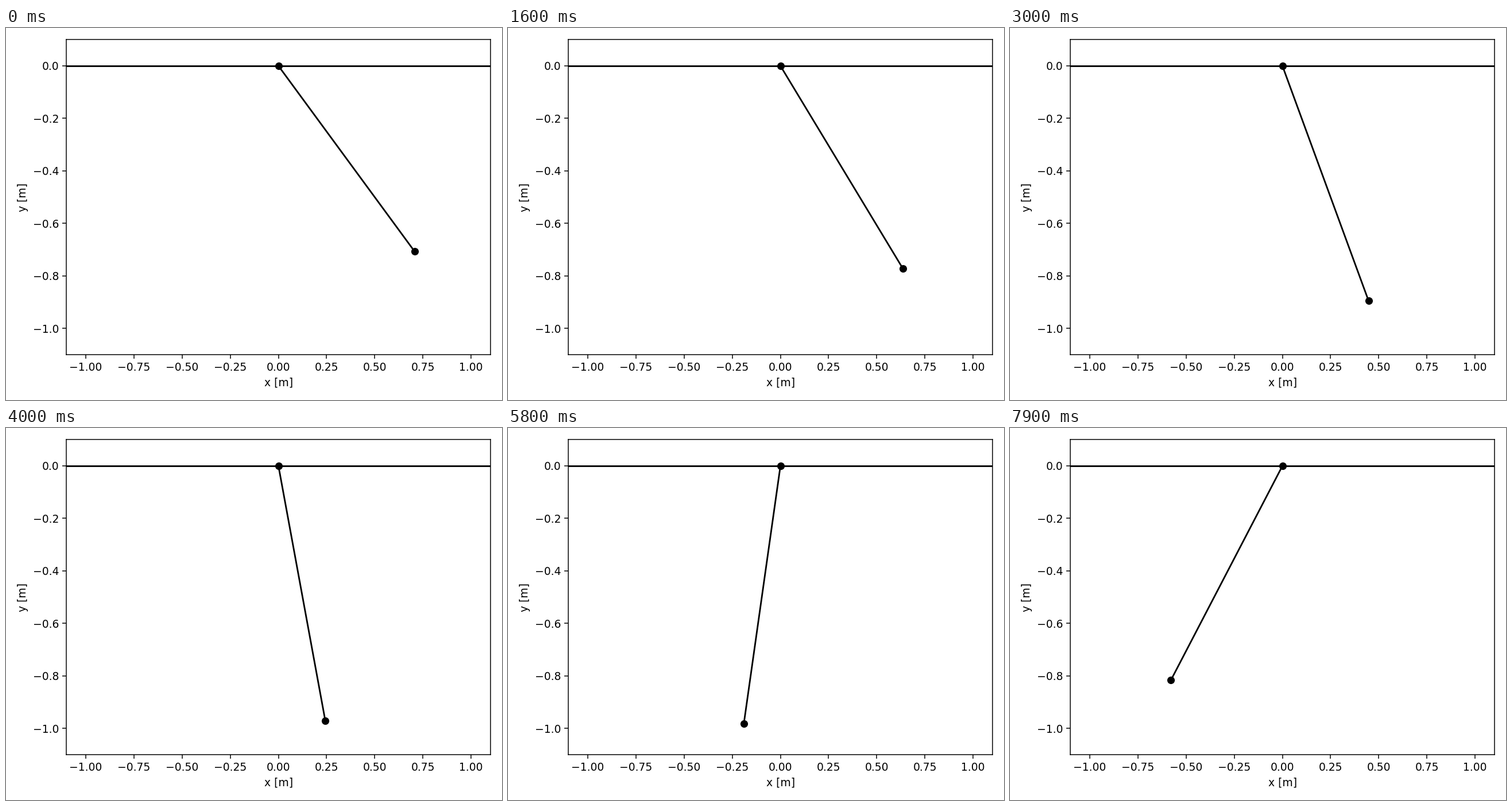
A matplotlib script for the animation above (8000 ms loop, 864 by 648 pixels).

```python
import numpy as np
import matplotlib.pyplot as plt
from matplotlib.animation import FuncAnimation

G = 9.81                  # gravity [m/s^2]
LENGTH = 1.0              # rod length [m]
THETA0 = np.pi / 4        # release angle
DT = 0.01                 # simulated seconds per frame
FRAMES = 80
OMEGA = np.sqrt(G / LENGTH)

plt.rcParams["font.family"] = "DejaVu Sans"

fig, ax = plt.subplots(figsize=(6.4, 4.8), dpi=135)
ax.set_xlim(-1.1 * LENGTH, 1.1 * LENGTH)
ax.set_ylim(-1.1 * LENGTH, 0.1 * LENGTH)
ax.set_xlabel("x [m]")
ax.set_ylabel("y [m]")
ax.axhline(0, color="black", lw=1.5)
rod, = ax.plot([], [], "o-", color="black", lw=1.5, ms=6)
fig.tight_layout()


def update(i):
    """Small-angle swing of the pendulum."""
    theta = THETA0 * np.cos(OMEGA * DT * i)
    rod.set_data([0, LENGTH * np.sin(theta)], [0, -LENGTH * np.cos(theta)])
    return rod,


anim = FuncAnimation(fig, update, frames=FRAMES, interval=100,
                     repeat=True, repeat_delay=0)
plt.show()
```
